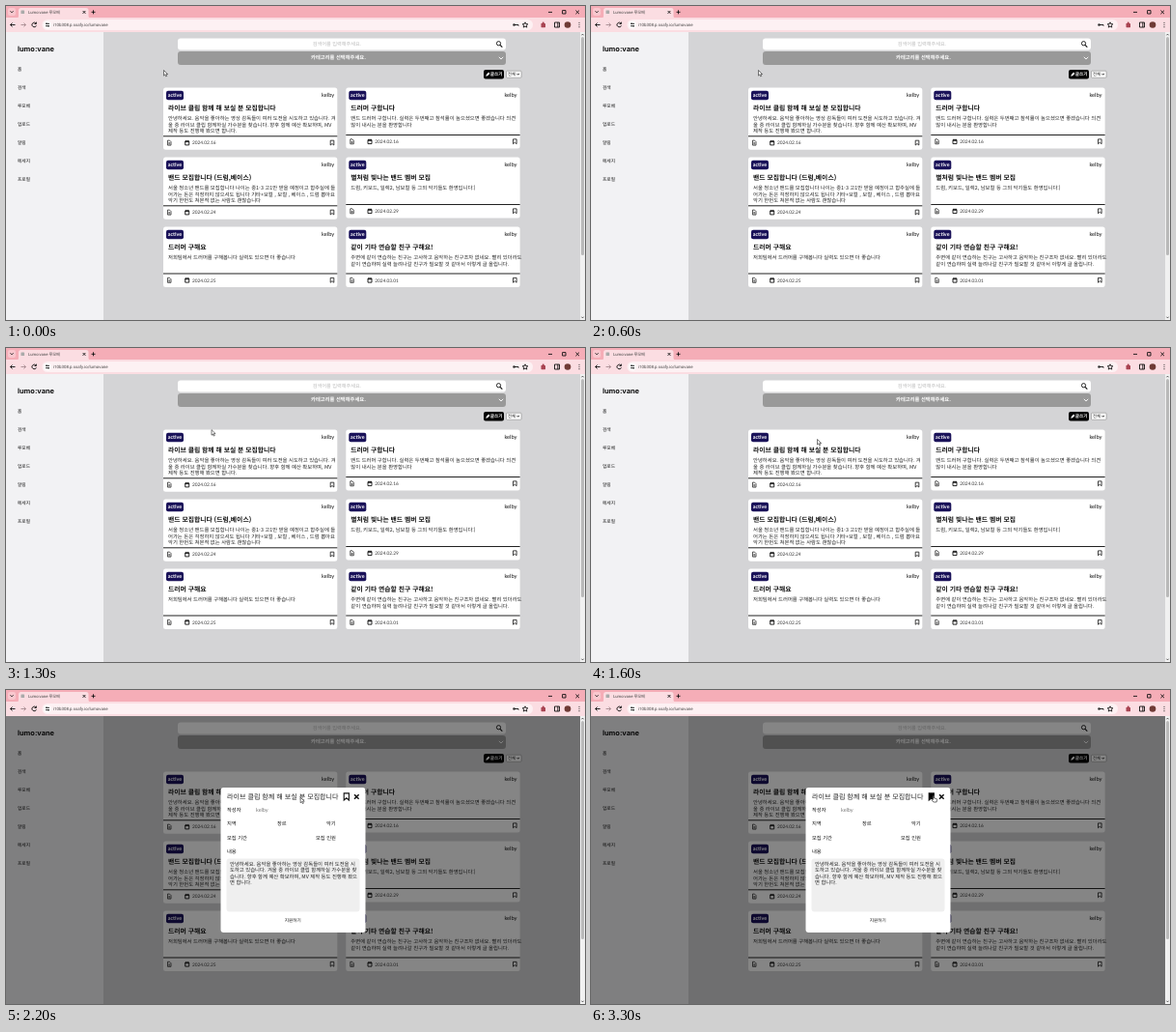
An HTML page that plays this animation: 600 px wide and 325 px high, repeating every 3.8 s.

```html
<!DOCTYPE html>
<html lang="ko">
<head>
<meta charset="utf-8">
<style>
html, body { margin: 0; width: 100%; height: 100%; overflow: hidden; }
svg { display: block; width: 600px; height: 325px; text-rendering: geometricPrecision; }
text { font-family: "Noto Sans CJK KR", "Noto Sans CJK", sans-serif; white-space: pre; }
.latin { font-family: Lato, sans-serif; }
.logo { font-family: Inter, sans-serif; }
.ui { font-family: Roboto, "Noto Sans CJK KR", sans-serif; }
.line { fill: none; stroke: #111; stroke-width: .9; }
</style>
</head>
<body>
<svg id="stage" viewBox="0 0 600 325"></svg>
<script>
const rect = (x, y, w, h, fill, r = 0, more = '') =>
  `<rect x="${x}" y="${y}" width="${w}" height="${h}" rx="${r}" fill="${fill}" ${more}/>`;
const line = (d, more = '') => `<path class="line" d="${d}" ${more}/>`;
const circle = (x, y, r, fill) => `<circle cx="${x}" cy="${y}" r="${r}" fill="${fill}"/>`;

// y is the middle of the glyphs
const text = (x, y, str, size, { fill = '#111', weight = 400, anchor = 'start', font = '' } = {}) =>
  `<text class="${font}" x="${x}" y="${y + size * .36}" font-size="${size}" fill="${fill}" ` +
  `font-weight="${weight}" text-anchor="${anchor}">${str}</text>`;

const paragraph = (x, y, lines, size = 5.35) =>
  lines.map((s, i) => text(x, y + i * 6.5, s, size, { fill: '#222' })).join('');

const bookmark = (x, y, s, more = '') =>
  line(`M${x - 2 * s} ${y - 2.6 * s}h${4 * s}v${5.4 * s}l${-2 * s} ${-1.7 * s}l${-2 * s} ${1.7 * s}z`, more);

const USER = 'kelby', BRAND = '루모베';

function browser() {
  return rect(0, 0, 600, 13, '#f5adb7') +
    rect(0, 12, 600, 15, '#fbdde2') +
    rect(2, 2, 8, 8, '#f9c7ce', 2) + line('M4.5 5.3l1.5 1.5l1.5-1.5') +
    '<path d="M11 12.5q2 0 2-2V4.500q0-2.500 2.500-2.500h67.500q2.500 0 2.500 2.500v6q0 2 2 2z" fill="#fbdde2"/>' +
    rect(15.5, 4.5, 3.6, 3.6, '#aaa', .4) +
    text(23, 6.4, 'Lumo:vane ' + BRAND, 4.2, { font: 'ui', fill: '#444' }) +
    line('M79.600 5l2.800 2.800m0-2.800l-2.800 2.800M88.500 6.300h4m-2-2v4', 'stroke-width=".6"') +
    line('M562 6.400h4M576.600 4.600h3.400v3.400h-3.400zM590.400 4.600l3.600 3.600m0-3.600l-3.600 3.600', 'stroke-width=".6"') +
    line('M9.500 19.500h-5m2-2l-2 2l2 2') +
    line('M15.500 19.500h5m-2-2l2 2l-2 2', 'style="stroke:#a78b90"') +
    line('M31 18a2.300 2.300 0 1 0 .4 2.200M31.400 16.600v1.900h-1.900') +
    rect(37.5, 14, 508.5, 11, '#fdf1f3', 5.5) +
    circle(43, 19.5, 3.7, '#fff') +
    line('M41 18.300h4M41 20.700h4', 'stroke-width=".6"') + circle(42, 18.3, .8, '#333') + circle(44, 20.7, .8, '#333') +
    text(49, 19.6, 'i10b308.p.ssafy.io/lumovane', 4.4, { font: 'ui', fill: '#444' }) +
    circle(526.5, 19.5, 1.3, '#333') + line('M527 19.500h4v1.200') +
    line('M538 16.800l.8 1.800l2 .2l-1.500 1.300l.5 2l-1.800-1.100l-1.800 1.100l.5-2l-1.500-1.300l2-.2z', 'stroke-width=".6"') +
    rect(554.5, 18, 4.5, 4.2, '#a94452', .6) + circle(556.7, 17.6, 1.1, '#a94452') +
    line('M568.500 17h5v5h-5zM571.800 17v5') +
    circle(582, 19.5, 3.3, '#6f3a35') +
    [17.3, 19.5, 21.7].map(y => circle(594, y, .6, '#333')).join('');
}

function sidebar() {
  const items = ['홈', '검색', BRAND, '업로드', '알림', '메세지', '프로필'];
  return rect(0, 27, 101, 298, '#f2f2f4') +
    text(12, 44.5, 'lumo:vane', 7.4, { weight: 700, font: 'logo' }) +
    items.map((s, i) => text(12, 65.3 + i * 19, s, 4.7, { weight: 500 })).join('');
}

function toolbar() {
  return rect(178, 33.5, 340, 12, '#fff', 3) +
    text(343, 39.4, '검색어를 입력해주세요.', 5.2, { fill: '#bbb', anchor: 'middle' }) +
    '<circle class="line" cx="510.500" cy="38.700" r="2.100"/>' + line('M512 40.300l2.300 2.300', 'style="stroke-width:1.2"') +
    rect(178, 47, 340, 14, '#999', 3) +
    text(344.5, 53.3, '카테고리를 선택해주세요.', 5.3, { fill: '#fff', weight: 700, anchor: 'middle' }) +
    line('M510.800 52.800l2.200 2.200l2.200-2.200', 'style="stroke:#fff"') +
    rect(495, 66, 21, 9.5, '#000', 2) +
    '<path d="M497.300 72.700l.5-1.800l2.300-2.300l1.300 1.300l-2.300 2.300z" fill="#fff"/>' +
    text(501.8, 70.8, '글쓰기', 4.6, { fill: '#fff', weight: 700 }) +
    rect(518.5, 67.2, 15.5, 7, '#fff', .8, 'stroke="#777" stroke-width=".5"') +
    text(520, 70.7, '전체', 4.3) + line('M529.500 70l1.200 1.200l1.200-1.200', 'stroke-width=".7"');
}

function card([title, lines, date], i) {
  const right = i % 2, row = i >> 1;
  const x = right ? 352.3 : 163, y = 84.5 + row * 72;
  const foot = y + (row == 2 ? 48.5 : right ? 49 : 50.3), mid = foot + 6.7;
  return rect(x, y, 180.3, foot - y + 14, '#fff', 2.5) +
    rect(x + 3, y + 3.3, 18, 9.4, '#1a1259', 2) +
    text(x + 12, y + 7.8, 'active', 5.4, { fill: '#fff', weight: 700, anchor: 'middle', font: 'latin' }) +
    text(x + 177.2, y + 7.8, USER, 5.7, { anchor: 'end', font: 'latin' }) +
    text(x + 5, y + 21, title, 6.8, { weight: 700 }) +
    paragraph(x + 5, y + 32, lines) +
    rect(x, foot - .5, 180.3, 1, '#222') +
    line(`M${x + 4.5} ${mid - 2.4}h2l1.500 1.500v3.500h-3.500zM${x + 5.4} ${mid + .2}h1.700m-1.700 1.200h1.700`, 'style="stroke-width:.7"') +
    line(`M${x + 22.7} ${mid - 1.600}h4v4h-4zM${x + 22.7} ${mid - .9}h4M${x + 23.700} ${mid - 2.600}v1m2-1v1`) +
    text(x + 30, mid + .1, date, 4.8, { fill: '#333', font: 'latin' }) +
    bookmark(x + 175, mid, .9, 'style="stroke-width:.8"');
}

const cards = [
  ['라이브 클립 함께 해 보실 분 모집합니다', [
    '안녕하세요. 음악을 좋아하는 영상 감독들이 여러 도전을 시도하고 있습니다. 겨',
    '울 중 라이브 클립 함께하실 가수분을 찾습니다. 향후 함께 예산 확보하며, MV',
    '제작 등도 진행해 봤으면 합니다.'], '2024.02.16'],
  ['드러머 구합니다', [
    '밴드 드러머 구합니다. 실력은 두번째고 참석률이 높으셨으면 좋겠습니다 의견',
    '많이 내시는 분을 환영합니다'], '2024.02.16'],
  ['밴드 모집합니다 (드럼,베이스)', [
    '서울 청소년 밴드를 모집합니다 나이는 중1-3 고1만 받을 예정이고 합주실에 들',
    '어가는 돈은 걱정하지 않으셔도 됩니다 기타+보컬 , 보컬 , 베이스 , 드럼 뽑아요',
    '악기 한번도 쳐본적 없는 사람도 괜찮습니다'], '2024.02.24'],
  ['별처럼 빛나는 밴드 멤버 모집', [
    '드럼, 키보드, 일렉2, 남보컬 등 그외 악기들도 환영입니다:)'], '2024.02.29'],
  ['드러머 구해요', [
    '저희팀에서 드러머를 구해봅니다 실력도 있으면 더 좋습니다'], '2024.02.25'],
  ['같이 기타 연습할 친구 구해요!', [
    '주변에 같이 연습하는 친구는 고사하고 음악하는 친구조차 없네요. 빨리 있더라도',
    '같이 연습하며 실력 늘려나갈 친구가 필요할 것 같아서 이렇게 글 올립니다.'], '2024.03.01'],
];

function modal() {
  const labels = [[229, 124, '작성자'], [229, 138.5, '지역'], [281, 138.5, '장르'], [332, 138.5, '악기'],
    [229, 153, '모집 기간'], [321, 153, '모집 인원'], [229, 167, '내용']];
  return rect(0, 27, 595, 298, '#000', 0, 'opacity=".48"') +
    rect(222.5, 101, 150, 150, '#fff', 3) +
    text(229, 110.6, cards[0][0], 7.05, { fill: '#222' }) +
    bookmark(352.8, 110.3, 1.3, 'id="mark" style="stroke-width:1.1"') +
    line('M361 108.200l4.600 4.600m0-4.600l-4.600 4.600', 'style="stroke-width:1.5"') +
    labels.map(([x, y, s]) => text(x, y, s, 5.3, { weight: 500 })).join('') +
    text(259, 124, USER, 5.5, { fill: '#777', font: 'latin' }) +
    rect(228.5, 174.5, 138, 55, '#efefef', 3) +
    paragraph(232, 180, [
      '안녕하세요. 음악을 좋아하는 영상 감독들이 여러 도전을 시',
      '도하고 있습니다. 겨울 중 라이브 클립 함께하실 가수분을 찾',
      '습니다. 향후 함께 예산 확보하며, MV 제작 등도 진행해 봤으',
      '면 합니다.']) +
    text(297.3, 238.6, '지원하기', 4.6, { weight: 500, anchor: 'middle' });
}

const stage = document.getElementById('stage');
stage.innerHTML =
  rect(0, 0, 600, 325, '#d4d4d6') + browser() + sidebar() + toolbar() + cards.map(card).join('') +
  rect(595, 27, 5, 298, '#f1f1f1') + rect(596, 32, 3, 226, '#b9b9b9', 1.5) +
  line('M596.500 30.300l1-1.300l1 1.300M596.500 321.700l1 1.300l1-1.300', 'style="stroke-width:.6"') +
  `<g id="modal">${modal()}</g>` +
  '<path id="arrow" d="M0 0v5.600l1.300-1.200l.9 2l1-.4l-.9-2h1.800z" fill="#fff" stroke="#222" stroke-width=".6"/>' +
  '<path id="hand" d="M-.6.300q.6-.7 1.200 0v2.200l2.400.5q.7.200.6 1l-.5 2.500h-3.200l-2-2.300q.2-.9 1.500-.1z" ' +
  'fill="#fff" stroke="#111" stroke-width=".6"/>';

// time, x, y of the pointer
const path = [[0, 163.5, 66.500], [600, 173.5, 66.5], [1000, 173.5, 66.5], [1500, 234.5, 94.5], [1800, 234.5, 94.5],
  [2500, 351, 122], [2700, 353.3, 115], [2800, 353.3, 115], [3000, 355, 109.5], [3800, 355, 109.5]];
const $ = id => document.getElementById(id);
const show = (id, on) => $(id).setAttribute('visibility', on ? 'visible' : 'hidden');

function pointer(t) {
  const i = path.findIndex(p => p[0] > t);
  const [t0, x0, y0] = path[i - 1], [t1, x1, y1] = path[i];
  const u = (t - t0) / (t1 - t0), e = u * u * (3 - 2 * u);
  return [x0 + (x1 - x0) * e, y0 + (y1 - y0) * e];
}

const start = performance.now();
function draw() {
  const t = Math.floor(((performance.now() - start) % 3800) / 100) * 100;
  const [x, y] = pointer(t), onMark = t >= 2900;
  for (const id of ['arrow', 'hand']) $(id).setAttribute('transform', `translate(${x} ${y})`);
  show('arrow', !onMark);
  show('hand', onMark);
  $('modal').style.display = t >= 1700 ? '' : 'none';
  $('mark').style.fill = t >= 3100 ? '#000' : 'none';
  requestAnimationFrame(draw);
}
draw();
</script>
</body>
</html>
```
